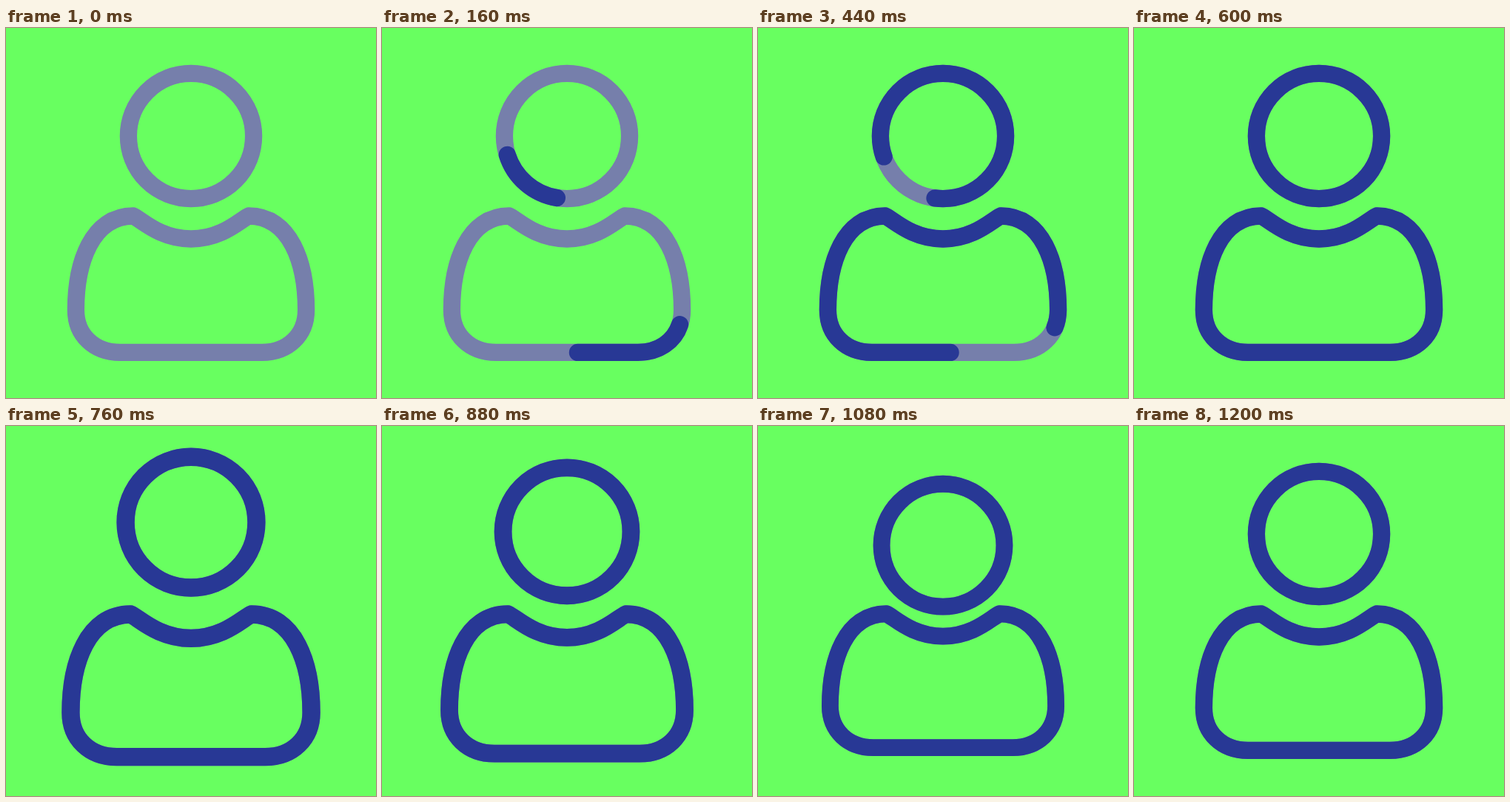
An HTML page for the animation above (2.04 s loop, 500 px wide and 500 px high).

```html
<!DOCTYPE html>
<html lang="en">
<head>
<meta charset="utf-8">
<title>User icon</title>
<style>
  html, body { margin: 0; height: 100%; overflow: hidden; background: #68ff60; }
  svg { display: block; width: 100%; height: 100%; }
  path { fill: none; stroke: #767fab; stroke-width: 23.3; stroke-linejoin: round; }
  .ink { stroke: #283895; stroke-linecap: round; }
</style>
</head>
<body>
<svg viewBox="0 0 500 500">
  <g id="head"></g>
  <g id="body"></g>
</svg>
<script>
const LOOP = 2040, STEP = 40, DRAW = 600, BEAT = 200;
const TURN = 100 / 360; // how far the stroke's tail travels along the outline

const HEAD_Y = 146, BODY_TOP = 242.4;
const headPath = 'M165.4 146a84.6 84.6 0 1 0 169.2 0a84.6 84.6 0 1 0 -169.2 0z';
const bodyPath = 'M405.6 381C405.6 415 381 438.4 346 438.4H154C119 438.4 94.4 415 94.4 381' +
  'C94.4 317 116 254 172 254C183 259 208 285 250 285C292 285 317 259 328 254' +
  'C384 254 405.6 317 405.6 381z';

function addShape(id, d, start) {
  const group = document.getElementById(id);
  group.innerHTML = `<path d="${d}"/><path class="ink" pathLength="1" d="${d}"/>`;
  return { group, ink: group.lastChild, start };
}
const head = addShape('head', headPath, 0);
const body = addShape('body', bodyPath, -0.026);

const ease = x => x * x * (3 - 2 * x);

// Eased value through keys spaced one beat apart, starting when the stroke is complete
function keyed(t, keys) {
  const x = Math.min(Math.max((t - DRAW) / BEAT, 0), keys.length - 1);
  const i = Math.min(Math.floor(x), keys.length - 2);
  return keys[i] + (keys[i + 1] - keys[i]) * ease(x - i);
}

function trim({ ink, start }, p) {
  ink.style.visibility = p > 0 ? 'visible' : 'hidden';
  ink.style.strokeDasharray = p < 1 ? `${p} ${1 - p}` : 'none';
  ink.style.strokeDashoffset = -(1 + start + TURN * p);
}

function place({ group }, pivotY, y, scale) {
  group.setAttribute('transform',
    `translate(250 ${y}) scale(${scale}) translate(-250 ${-pivotY})`);
}

function render(t) {
  const p = ease(Math.min(t / DRAW, 1));
  trim(head, p);
  trim(body, p);
  const scale = keyed(t, [1, 1.05, 0.97, 1]);
  place(head, HEAD_Y, keyed(t, [HEAD_Y, 128.3, 169.5, HEAD_Y]), scale);
  place(body, BODY_TOP, BODY_TOP, scale);
}

const began = performance.now();
function tick() {
  const t = (performance.now() - began) % LOOP;
  render(Math.floor(t / STEP) * STEP);
  requestAnimationFrame(tick);
}
tick();
</script>
</body>
</html>
```
